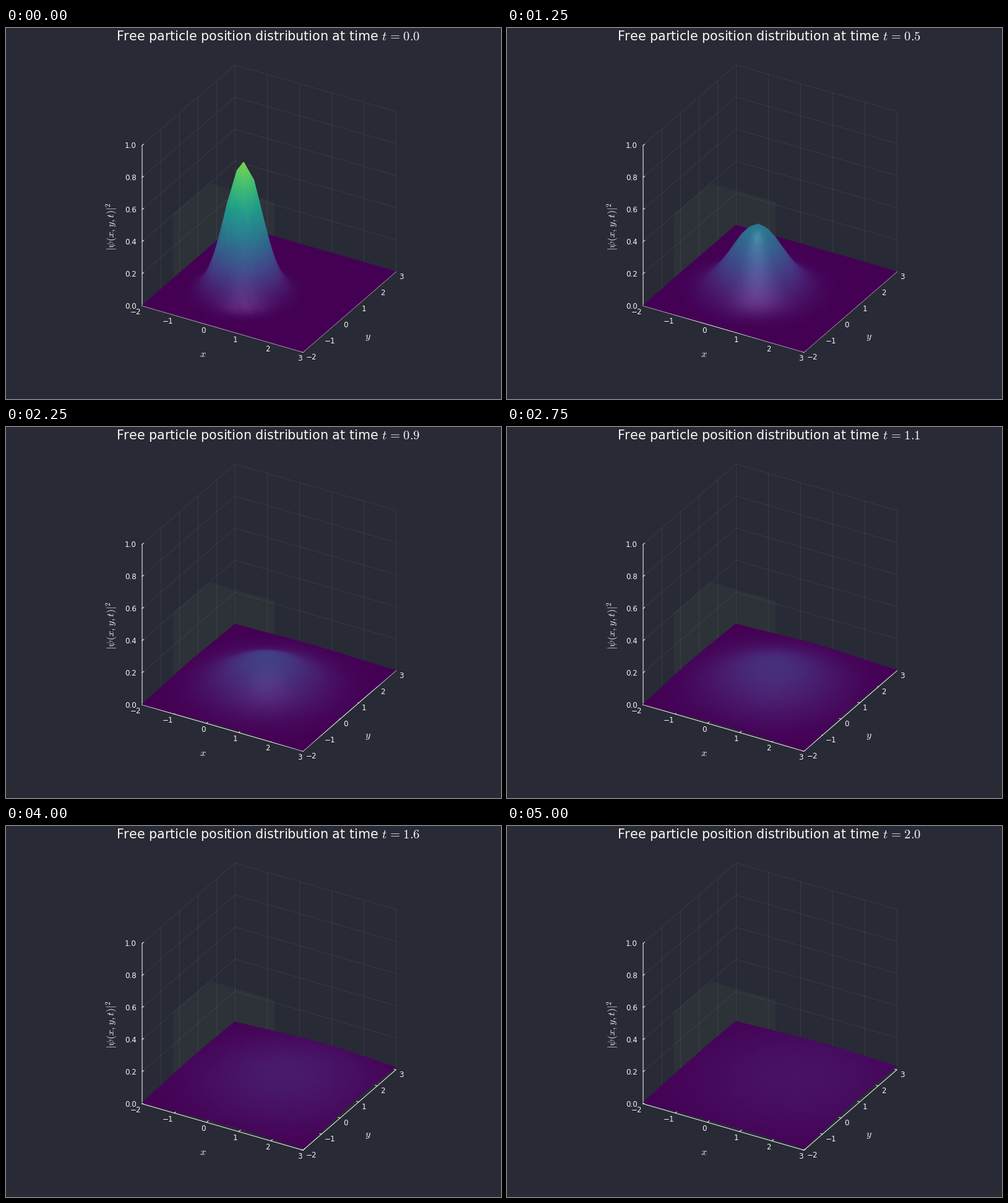
Recreate the animation shown at these times as a matplotlib script. Size 800 px wide and 600 px high, loop 5.12 s.

```python
import numpy as np
import matplotlib.pyplot as plt
from matplotlib.animation import FuncAnimation

BG, FG, WALL = "#282a36", "#f8f8f2", "#2d3238"
STEPS, LOOP_MS, DT = 41, 5120, 0.05
PEAK, VAR, TAU, SPEED = 0.808, 0.25, 0.5, 0.5
LO, HI = -2, 3
# Direction of the brightest reflection, between the viewer and a higher light.
SHEEN = np.array([0.372, -0.644, 0.669])
GLOSS, SHINE = 0.12, 16
LIFT = 0.6  # keeps the floor from hiding the axis lines

plt.rcParams.update({"font.family": "DejaVu Sans", "mathtext.fontset": "cm"})
fig = plt.figure(figsize=(8, 6), dpi=100, facecolor=BG)
ax = fig.add_axes([0, 0, 1, 1])
ax.set(xlim=(0, 800), ylim=(600, 0))
ax.axis("off")


def project(x, y, z):
    """Orthographic view of the box, in stage pixels."""
    return (220 + 52 * (x - LO) + 30 * (y - LO),
            449.3 + 15 * (x - LO) - 26 * (y - LO) - 259.5 * z)


def px(size):
    return size * 0.72


def line(points, **style):
    xs, ys = zip(*points)
    ax.plot(xs, ys, lw=0.72, **style)


def edge(*corners, **style):
    line([project(*c) for c in corners], **style)


def tick(point, dx, dy):
    x, y = point
    line([(x, y), (x + dx, y + dy)], color=FG, zorder=2)


def label(x, y, text, ha="center", size=11.9, **style):
    return ax.text(x, y, text, ha=ha, va=style.pop("va", "baseline"),
                   fontsize=px(size), color=FG, zorder=6, **style)


def draw_box():
    ax.fill([270, 270, 330, 434, 434, 374], [404, 300, 251, 281, 385, 437],
            color=WALL, lw=0, zorder=0)
    grid = dict(color=FG, alpha=0.07, zorder=1)
    for v in range(LO, HI + 1):
        k = v - LO
        edge((LO, v, 0), (LO, v, 1), **grid)
        if v > LO:
            edge((v, HI, 0), (v, HI, 1), **grid)
        text = str(v).replace("-", "\u2212")
        tick(project(v, LO, 0), 3, -2.6)
        tick(project(HI, v, 0), -3.4, -1)
        label(218.3 + 52 * k, 462.6 + 15 * k, text, "right")
        label(485 + 30 * k, 535.6 - 25.9 * k, text, "left")
    for z in np.linspace(0, 1, 6):
        edge((LO, LO, z), (LO, HI, z), (HI, HI, z), **grid)
        x, y = project(LO, LO, z)
        tick((x, y), 2.6, -2)
        label(211, y + 4.6, f"{z:.1f}", "right")
    edge((LO, LO, 1), (LO, LO, 0), (HI, LO, 0), (HI, HI, 0), color=FG, zorder=3)
    label(318.2, 531.5, "$x$", size=16.3)
    label(585, 503, "$y$", size=16.3)
    label(170.7, 321, r"$|\psi(x,y,t)|^2$", size=16.3, rotation=90, va="center")


# Rows run from the back of the box to the front, so nearer faces paint last.
X, Y = np.meshgrid(np.linspace(LO, HI, 26), np.linspace(HI, LO, 26))


def density(t):
    """Height of the spreading packet and its slopes in box proportions."""
    spread = 1 + (t / TAU) ** 2
    var = VAR * spread
    dx, dy = X - SPEED * t, Y - SPEED * t
    z = PEAK / spread * np.exp(-(dx**2 + dy**2) / (2 * var))
    return z, -5 * z * dx / var, -5 * z * dy / var


def shade(z, zx, zy):
    facing = (SHEEN[2] - zx * SHEEN[0] - zy * SHEEN[1]) / np.sqrt(1 + zx**2 + zy**2)
    glow = GLOSS * np.clip(facing, 0, 1) ** SHINE
    return np.clip(plt.cm.viridis(z)[..., :3] + glow[..., None], 0, 1)


draw_box()
title = label(423.3, 20.5, "", size=20.7)


def update(step):
    t = round(step * DT, 2)
    for old in list(ax.collections):
        old.remove()
    z, zx, zy = density(t)
    sx, sy = project(X, Y, z)
    ax.pcolormesh(sx, sy - LIFT, shade(z, zx, zy), shading="gouraud", zorder=4)
    title.set_text("Free particle position distribution at time "
                   rf"$t\hspace{{0.1}}=\hspace{{0.1}}{t}$")
    return []


anim = FuncAnimation(fig, update, frames=STEPS, init_func=lambda: [],
                     interval=LOOP_MS / STEPS, repeat=True, repeat_delay=0)
plt.show()
```
